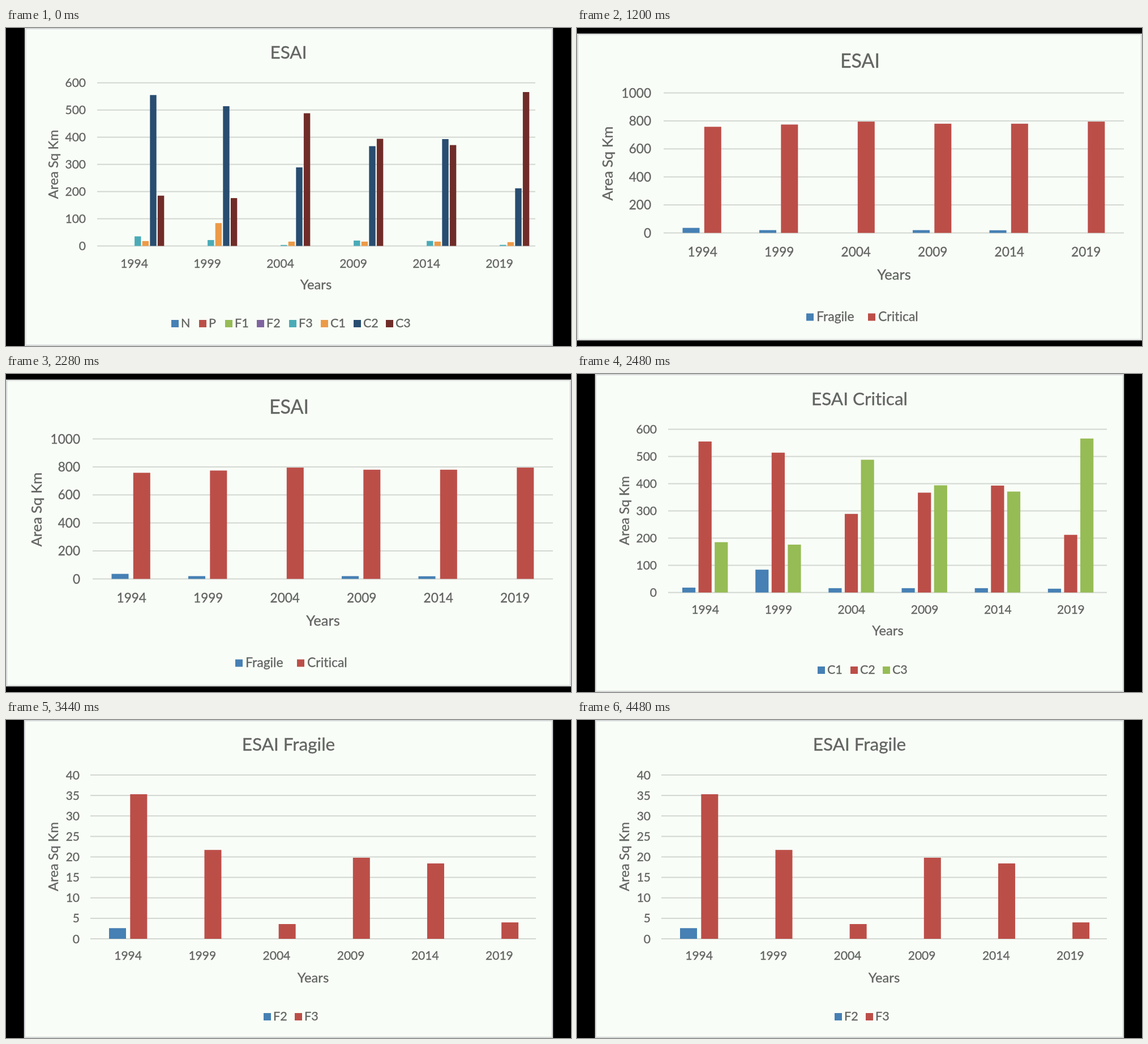
These frames come from a looping animation (998 by 561 pixels, 4520 ms). An HTML page:

```html
<!DOCTYPE html>
<html lang="en">
<head>
<meta charset="utf-8">
<title>ESAI charts</title>
<style>
  html, body { margin: 0; width: 100%; height: 100%; overflow: hidden; background: #000; }
  svg { display: block; width: 998px; height: 561px; }
  text {
    font-family: Lato, "Open Sans", sans-serif; font-variant-ligatures: none;
    fill: #626562; stroke: #626562; stroke-width: 0.35px;
  }
</style>
</head>
<body>
<svg id="stage" viewBox="0 0 998 561"></svg>
<script>
const NS = "http://www.w3.org/2000/svg";
const stage = document.getElementById("stage");
const LOOP = 4520;
const YEARS = [1994, 1999, 2004, 2009, 2014, 2019];

const BLUE = "#4680b4", RED = "#bc4e48", GREEN = "#96bc55", PURPLE = "#8064a0",
      TEAL = "#4aabb7", ORANGE = "#ec9a48", NAVY = "#284d70", MAROON = "#702c28";

const c1 = [18, 84, 16, 16, 16, 14];
const c2 = [555, 514, 289, 367, 393, 212];
const c3 = [185, 176, 488, 394, 371, 566];
const f3 = [35.3, 21.7, 3.6, 19.8, 18.4, 4];

const series = (name, color, values = []) => ({ name, color, values });

// Shared type sizes and positions; each chart overrides what differs.
const base = {
  frame: [33, 1, 932, 559], left: 161, right: 936, max: 600, step: 100,
  labelX: 141, labelSize: 21, yearY: 423,
  titleX: 499, titleY: 54, titleSize: 31.5,
  axisSize: 23.7, axisX: 547.5, axisY: 461, sideX: 92, sideY: 240.5,
  legendSize: 21.5, legendGap: 17
};

const charts = [
  { ...base, start: 0, title: "ESAI", frame: [34.2, 1, 930.8, 558.8],
    right: 935, top: 96.7, bottom: 384.5,
    barX: 11.7, pitch: 13.6, barWidth: 11.4,
    legendX: [292, 341, 387, 443, 500, 556, 614, 671], legendY: 515,
    series: [
      series("N", BLUE), series("P", RED), series("F1", GREEN), series("F2", PURPLE),
      series("F3", TEAL, f3), series("C1", ORANGE, c1),
      series("C2", NAVY, c2), series("C3", MAROON, c3)
    ] },
  { ...base, start: 1160, title: "ESAI", frame: [1, 11, 996, 539],
    left: 153, right: 966, top: 114.5, bottom: 361.5, max: 1000, step: 200,
    labelX: 131, labelSize: 22.6, yearY: 403,
    titleX: 500, titleY: 70, titleSize: 34,
    axisSize: 25.5, axisX: 560, axisY: 444, sideX: 63, sideY: 239,
    barX: 33.5, pitch: 38.3, barWidth: 30,
    legendX: [405, 514], legendY: 503.5, legendSize: 23, legendGap: 18,
    series: [
      series("Fragile", BLUE, [36, 20, 0, 20, 19, 0]),
      series("Critical", RED, [758, 774, 795, 780, 780, 795])
    ] },
  { ...base, start: 2320, title: "ESAI Critical", top: 97.5, bottom: 385.5,
    titleY: 55, axisX: 549, sideY: 241,
    barX: 25, pitch: 28.6, barWidth: 23.2,
    legendX: [425, 483, 540], legendY: 516,
    series: [series("C1", BLUE, c1), series("C2", RED, c2), series("C3", GREEN, c3)] },
  { ...base, start: 3440, title: "ESAI Fragile",
    left: 149, top: 97, bottom: 386, max: 40, step: 5,
    labelX: 130, axisX: 542.5, axisY: 463, sideY: 241,
    barX: 33, pitch: 37.3, barWidth: 30,
    legendX: [455, 510], legendY: 517,
    series: [series("F2", BLUE, [2.6]), series("F3", RED, f3)] }
];

function add(parent, tag, attrs, text) {
  const node = document.createElementNS(NS, tag);
  for (const key in attrs) node.setAttribute(key, attrs[key]);
  if (text !== undefined) node.textContent = text;
  parent.appendChild(node);
  return node;
}

function buildChart(c) {
  const g = add(stage, "g", {});
  const rect = (x, y, width, height, fill, extra) =>
    add(g, "rect", { x, y, width, height, fill, ...extra });
  const label = (x, y, size, text, anchor = "middle", extra) =>
    add(g, "text", { x, y, "font-size": size, "text-anchor": anchor, ...extra }, text);
  const yOf = value => c.bottom - value / c.max * (c.bottom - c.top);
  const slot = (c.right - c.left) / YEARS.length;

  rect(...c.frame, "#f9fdf7", { stroke: "#d5d8d8", "stroke-width": 2.5 });
  label(c.titleX, c.titleY, c.titleSize, c.title);

  for (let value = 0; value <= c.max; value += c.step) {
    const y = yOf(value);
    rect(c.left, y - 1, c.right - c.left, 2, "#d2d7d2");
    label(c.labelX, y + c.labelSize * 0.36, c.labelSize, value, "end");
  }

  YEARS.forEach((year, i) => {
    const x = c.left + i * slot;
    label(x + slot / 2 + 1, c.yearY, c.labelSize, year);
    c.series.forEach((s, j) => {
      const value = s.values[i];
      if (!value) return;
      const y = yOf(value);
      rect(x + c.barX + j * c.pitch, y, c.barWidth, c.bottom - y, s.color);
    });
  });

  label(c.axisX, c.axisY, c.axisSize, "Years");
  label(0, 0, c.axisSize, "Area Sq Km", "middle",
    { transform: `translate(${c.sideX} ${c.sideY}) rotate(-90)` });

  c.series.forEach((s, j) => {
    const x = c.legendX[j];
    rect(x, c.legendY, 13, 13, s.color);
    label(x + c.legendGap, c.legendY + 13.3, c.legendSize, s.name, "start");
  });
  return g;
}

const views = charts.map(buildChart);

function draw(time) {
  const current = charts.filter(c => c.start <= time).length - 1;
  views.forEach((view, i) => view.setAttribute("visibility", i === current ? "visible" : "hidden"));
}

const began = performance.now();
function tick() {
  draw((performance.now() - began) % LOOP);
  requestAnimationFrame(tick);
}
tick();
</script>
</body>
</html>
```
